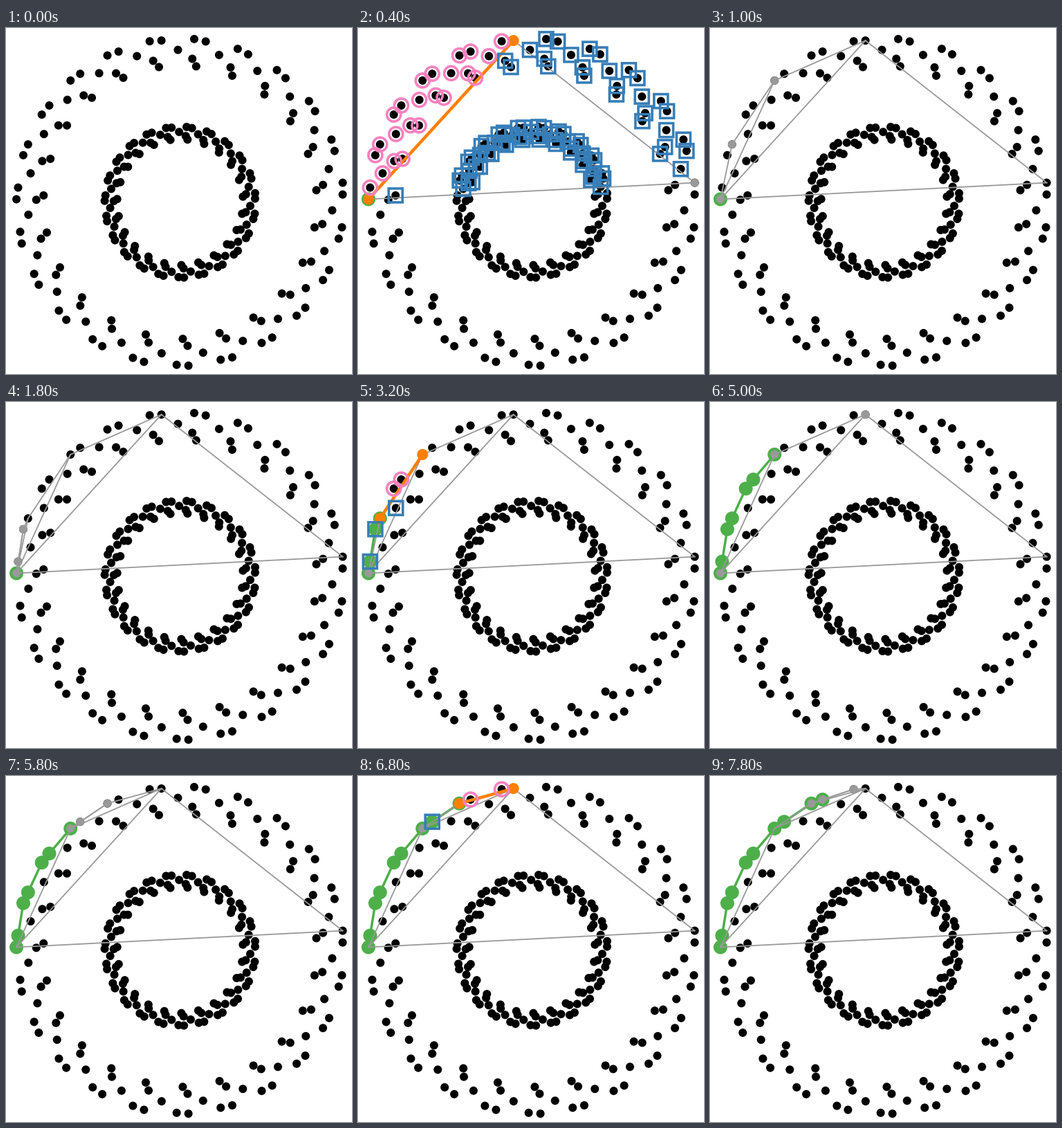
These frames come from a looping animation (500 by 500 pixels, 8 s). A matplotlib script:

```python
import numpy as np
import matplotlib.pyplot as plt
from matplotlib.animation import FuncAnimation
from matplotlib.collections import PatchCollection
from matplotlib.patches import Circle, Rectangle

SIZE, DPI = 500, 100
FRAMES, INTERVAL = 40, 200
CENTER = 251.65
PX = 72 / DPI
GREY, GREEN, ORANGE = "#999999", "#4daf4a", "#ff7f00"
PINK, BLUE = "#f781bf", "#377eb8"

# one arm of the ring: (radius, clockwise angle from the top in degrees)
ARM = [(236.6, 4.93), (235.1, 9.05), (220.05, 14.82), (207.9, 20.5), (197.6, 22.38)]
ARMS = 23


def ring(scale):
    pts = []
    for k in range(ARMS):
        for r, deg in ARM:
            a = np.radians(deg + 360 * k / ARMS)
            pts.append((CENTER + scale * r * np.sin(a), CENTER - scale * r * np.cos(a)))
    return pts


def height(p, a, b):
    """Signed offset of p from line ab, positive outside the hull."""
    return (b[1] - a[1]) * (p[0] - a[0]) - (b[0] - a[0]) * (p[1] - a[1])


def quickhull(points):
    """Return one state per animation step."""
    left, right = min(points), max(points)
    hull, stack, steps = [left], [], [{}]

    def record(**extra):
        edges = [(left, right)]
        for p, q, r in stack:
            edges += [(p, q), (q, r)]
        steps.append(dict(edges=edges, hull=list(hull), corners=stack[-1], **extra))

    def split(a, b, outside):
        apex = max(outside, key=lambda p: height(p, a, b))
        stack.append((a, apex, b))
        record()
        visit(a, apex, outside)
        record()
        visit(apex, b, outside)
        stack.pop()

    def visit(a, b, candidates):
        rest = [p for p in candidates if p not in (a, b)]
        keep = [p for p in rest if height(p, a, b) > 0]
        drop = [p for p in rest if height(p, a, b) <= 0]
        record(segment=(a, b), keep=keep, drop=drop)
        if keep:
            split(a, b, keep)
        else:
            hull.append(b)

    upper = [p for p in points if p not in (left, right) and height(p, left, right) > 0]
    split(left, right, upper)
    return steps


points = ring(1) + ring(0.461)
steps = quickhull(points)[:FRAMES]

fig = plt.figure(figsize=(SIZE / DPI, SIZE / DPI), dpi=DPI, facecolor="white")
ax = fig.add_axes([0, 0, 1, 1])
ax.set_xlim(0, SIZE)
ax.set_ylim(SIZE, 0)
ax.axis("off")
ax.add_collection(PatchCollection([Circle(p, 6) for p in points],
                                  facecolor="black", edgecolor="none", zorder=1))
drawn = []


def path(pts, color, width, z):
    xs, ys = zip(*pts)
    drawn.extend(ax.plot(xs, ys, color=color, lw=width * PX, zorder=z))


def dots(pts, color, radius, z):
    for p in pts:
        drawn.append(ax.add_patch(Circle(p, radius, fc=color, ec="none", zorder=z)))


def marks(pts, color, square):
    style = dict(fill=False, ec=color, lw=3.6 * PX, zorder=8, snap=False)
    for x, y in pts:
        shape = Rectangle((x - 10, y - 10), 20, 20, **style) if square \
            else Circle((x, y), 10, **style)
        drawn.append(ax.add_patch(shape))


def draw(i):
    while drawn:
        drawn.pop().remove()
    step = steps[i]
    if not step:
        return
    path(step["hull"], GREEN, 3.5, 2)
    dots(step["hull"], GREEN, 10, 3)
    for edge in step["edges"]:
        path(edge, GREY, 1.8, 4)
    dots(step["corners"], GREY, 6, 5)
    if "segment" in step:
        path(step["segment"], ORANGE, 4.5, 6)
        dots(step["segment"], ORANGE, 8, 7)
        marks(step["keep"], PINK, False)
        marks(step["drop"], BLUE, True)


anim = FuncAnimation(fig, draw, frames=FRAMES, interval=INTERVAL,
                     init_func=lambda: draw(0), repeat=True, repeat_delay=0)
plt.show()
```
